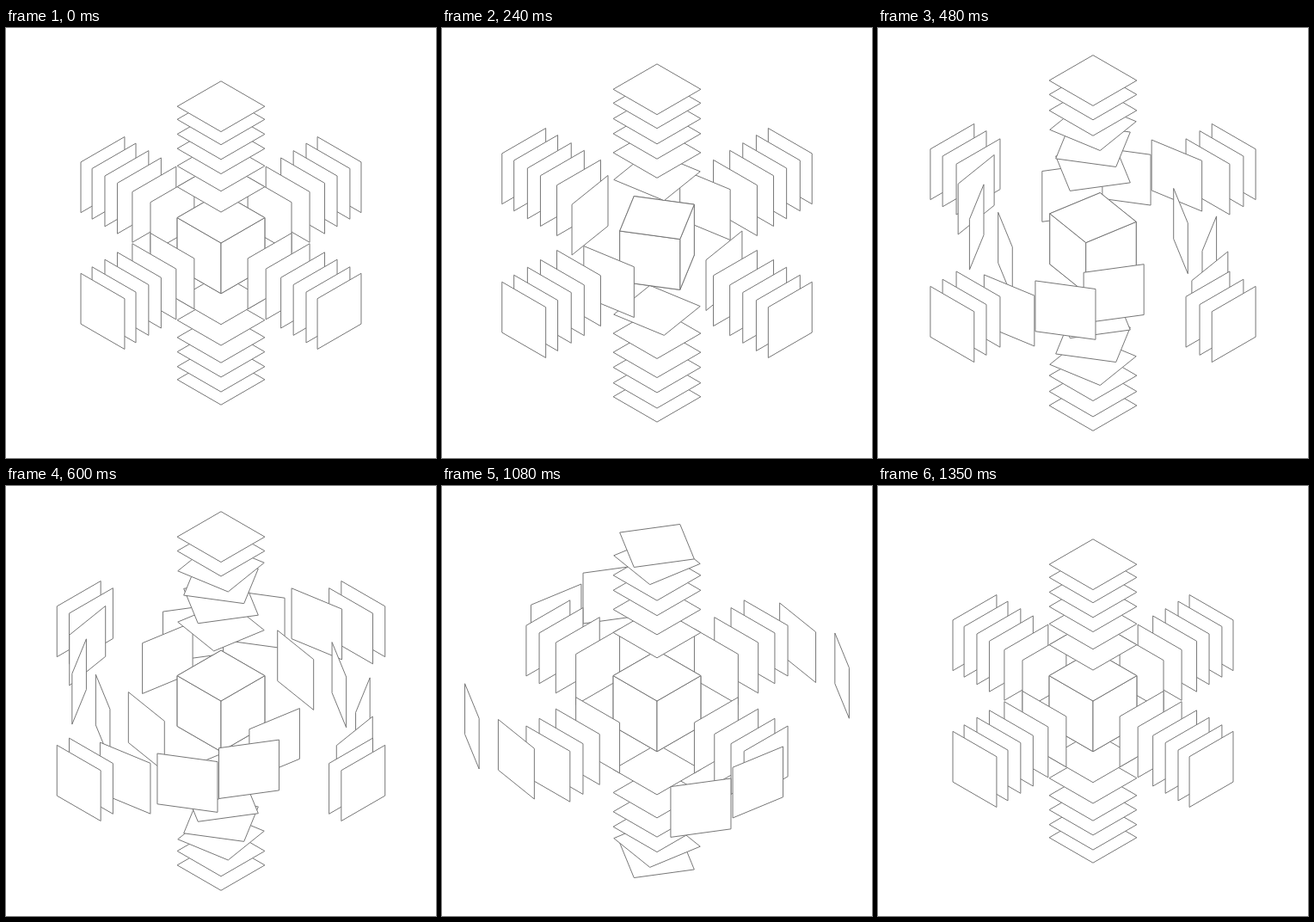
Animation, 500 px wide and 500 px high, one loop 1380 ms. Source, as an HTML page with a canvas:

```html
<!DOCTYPE html>
<html lang="en">
<head>
<meta charset="utf-8">
<title>Exploding cubes</title>
<style>
  html, body { margin: 0; width: 100%; height: 100%; overflow: hidden; background: #fff; }
  canvas { display: block; width: 500px; height: 500px; }
</style>
</head>
<body>
<canvas id="stage" width="500" height="500"></canvas>
<script>
const ctx = document.getElementById('stage').getContext('2d');
const LOOP = 1380, STEP = 30, STEPS = 45;
const HALF = 36;                                  // half the panel side
const UP = Math.sqrt(2 / 3), DEPTH = Math.sqrt(1 / 3); // isometric view
const REST = [0, 44, 73.8, 98.5, 119, 140, 158.5];
const SWELL = [0, 27, 31.7, 35.3, 36.4, 38, 39.6];
const LAG = 4 / STEPS, TURN = 20 / STEPS;

const clamp = x => Math.min(1, Math.max(0, x));
const smooth = x => x * x * (3 - 2 * x);
const project = (x, y, z) => [250 + x, 250 - UP * y + DEPTH * z];

function reach(k, p) {
  const swell = 1 - Math.abs(2 * p - 1) ** (2 + 0.03 * k);
  return HALF + REST[k] + SWELL[k] * swell;
}

function spin(k, p) {
  return smooth(clamp((p - k * LAG) / TURN)) * Math.PI / 2;
}

function panel(points) {
  ctx.beginPath();
  for (const pt of points) ctx.lineTo(...project(...pt));
  ctx.closePath();
  ctx.fill();
  ctx.stroke();
}

function lid(y, turn) {
  const r = HALF * Math.SQRT2;
  panel([0, 1, 2, 3].map(i => {
    const a = turn + i * Math.PI / 2;
    return [r * Math.sin(a), y, r * Math.cos(a)];
  }));
}

function wall(d, a) {
  const s = Math.sin(a), c = Math.cos(a);
  const corner = (u, v) => [d * s + u * c, v, d * c - u * s];
  panel([corner(-HALF, HALF), corner(HALF, HALF), corner(HALF, -HALF), corner(-HALF, -HALF)]);
}

// Draws the half of one box that faces the viewer (front) or faces away.
function half(k, p, front) {
  const d = reach(k, p), turn = spin(k, p);
  if (!front) lid(-d, turn);
  [0, 1, 2, 3]
    .map(i => turn + Math.PI / 4 + i * Math.PI / 2)
    .filter(a => (Math.cos(a) > 0) === front)
    .sort((a, b) => Math.cos(a) - Math.cos(b))
    .forEach(a => wall(d, a));
  if (front) lid(d, turn);
}

function draw(p) {
  ctx.fillStyle = '#fff';
  ctx.fillRect(0, 0, 500, 500);
  ctx.strokeStyle = '#777';
  ctx.lineWidth = 1;
  ctx.lineJoin = 'round';
  for (let k = REST.length - 1; k >= 0; k--) half(k, p, false);
  for (let k = 0; k < REST.length; k++) half(k, p, true);
}

let start;
function tick(now) {
  start ??= now;
  draw(Math.floor(((now - start) % LOOP) / STEP) / STEPS);
  requestAnimationFrame(tick);
}
draw(0);
requestAnimationFrame(tick);
</script>
</body>
</html>
```
